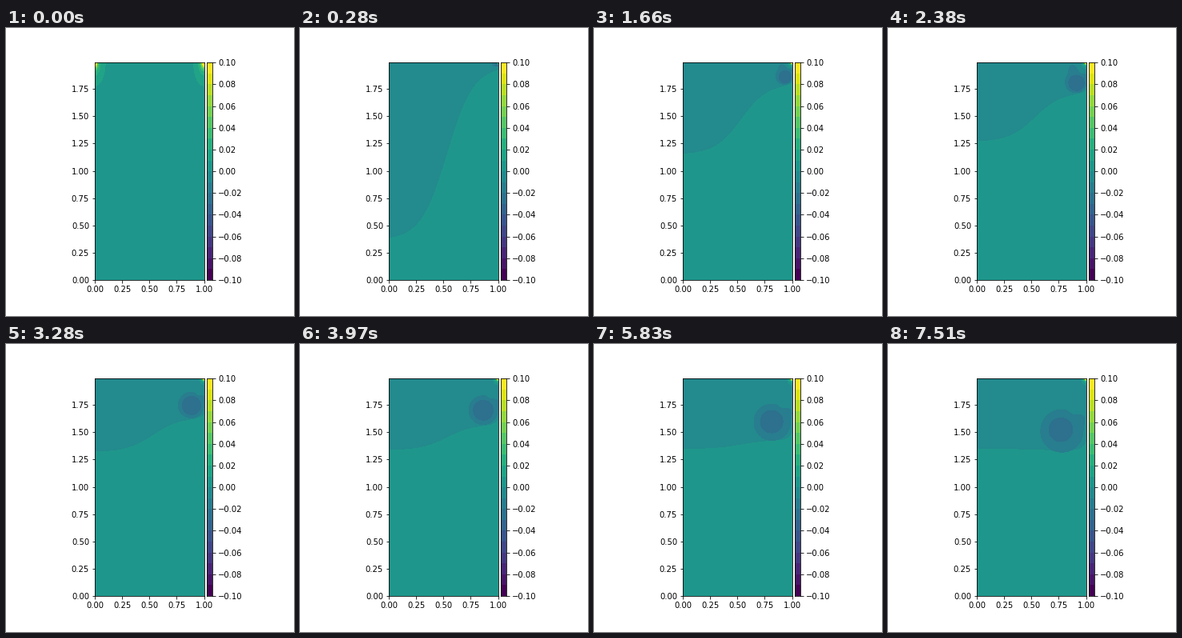
Animation of 360 by 360 pixels, one loop 7990 ms. Source, as a matplotlib script:

```python
import numpy as np
import matplotlib.pyplot as plt
from matplotlib.animation import FuncAnimation
from matplotlib.patches import Ellipse, Polygon

SIZE, DPI = 360, 72
LEFT, TOP, BOTTOM = 111.07, 43.2, 315.0
HEIGHT = 255 / 128
UNIT = (BOTTOM - TOP) / HEIGHT
WALL = LEFT + UNIT
INTERVAL, FRAMES = 34, 235
START, END = 0.16, 7.51

plt.rcParams.update({"font.family": "DejaVu Sans", "font.size": 10})

levels = np.linspace(-0.1, 0.1, 21)
middles = (levels[:-1] + levels[1:]) / 2
norm = plt.Normalize(middles[0], middles[-1])


def band(value):
    return plt.cm.viridis(norm(value))


def to_data(x, y):
    return np.column_stack([(x - LEFT) / UNIT, (BOTTOM - y) / UNIT])


fig = plt.figure(figsize=(SIZE / DPI, SIZE / DPI), dpi=DPI, facecolor="white")


def pixel_axes(left, width):
    return fig.add_axes([left / SIZE, 1 - BOTTOM / SIZE,
                         width / SIZE, (BOTTOM - TOP) / SIZE])


ax = pixel_axes(LEFT, UNIT)
ax.set(xlim=(0, 1), ylim=(0, HEIGHT), facecolor=band(0.005),
       xticks=np.arange(0, 1.01, 0.25), yticks=np.arange(0, 1.8, 0.25))

cax = pixel_axes(WALL + 3.6, UNIT * 0.05)
cax.pcolormesh([0, 1], levels, middles[:, None], cmap="viridis", norm=norm)
cax.set(xticks=[], yticks=levels[::2], ylim=(-0.1, 0.1))
cax.yaxis.tick_right()
cax.set_yticklabels([f"{v:.2f}".replace("-", "\u2212")
                     for v in np.round(levels[::2], 2) + 0.0])


def add(patch, value):
    patch.set(facecolor=band(value), linewidth=0, antialiased=False)
    return ax.add_patch(patch)


def region(value):
    return add(Polygon(np.zeros((3, 2))), value)


def corner(x, value):
    return add(Ellipse((x, HEIGHT), 0, 0), value)


def set_size(spot, width, height):
    spot.set_width(2 * width / UNIT)
    spot.set_height(2 * height / UNIT)


upper, ring, core = region(-0.005), region(-0.015), region(-0.025)
eddy = corner(1, 0.005)
# Nested corner contours shrink as their level rises.
spots = [(corner(x, v + 0.005), 0.01 / v, x) for x in (0, 1) for v in levels[11:-1]]

ACROSS = np.linspace(0, 1, 150)
THETA = np.linspace(0, 2 * np.pi, 181)


def bump(centre, width):
    return np.exp(-((np.degrees(THETA) - centre) / width) ** 2)


TAIL = 0.22 * bump(32, 16) - 0.1 * bump(60, 14)
PLUME = bump(104, 20)


def disc(x, y, radius):
    return to_data(x + radius * np.cos(THETA), y - radius * np.sin(THETA))


def zero_line(t):
    """Streamline between the two circulations: a sigmoid lifted at the wall."""
    left = 130.5 + 61 * np.exp((0.94 - t) / 0.85)
    depth = 17.2 * t - 0.7 * t ** 2
    step = 1 / (1 + np.exp(-8.3 * (ACROSS - 0.53)))
    lift = 0.12 * depth * np.exp((ACROSS - 1) / 0.04)
    return to_data(LEFT + UNIT * ACROSS, left + (TOP + depth - left) * step - lift)


def update(frame):
    t = min(frame * INTERVAL / 1000, END)
    moving = t >= START
    for patch in (upper, ring, core, eddy):
        patch.set_visible(moving)

    growth = 1 - np.exp(-t)
    for spot, scale, side in spots:
        spot.set_visible(not moving or side == 1)
        if moving:
            set_size(spot, 4 * growth * scale ** 0.6, 5 * growth * scale ** 0.6)
        else:
            set_size(spot, 13 * scale ** 0.9, 29 * scale ** 0.9)
    if not moving:
        return
    set_size(eddy, 6 * growth, 8 * growth)

    upper.set_xy(np.vstack([zero_line(t), [[1, HEIGHT], [0, HEIGHT]]]))

    x = WALL - 5.7 * t ** 0.85
    y = TOP + 11.7 * t - 0.42 * t ** 2
    core.set_xy(disc(x, y, 15.4 * (1 - np.exp(-t / 2.4))))

    drift = 0.45 * (t - 4.3)
    plume = 0.8 * np.exp(-((t - 2.1) / 0.6) ** 2)
    ring.set_xy(disc(x + drift, y + drift,
                     7.7 * t ** 0.615 * (1 + TAIL + plume * PLUME)))


anim = FuncAnimation(fig, update, frames=FRAMES, interval=INTERVAL,
                     init_func=lambda: update(0), repeat=True, repeat_delay=0)
plt.show()
```
